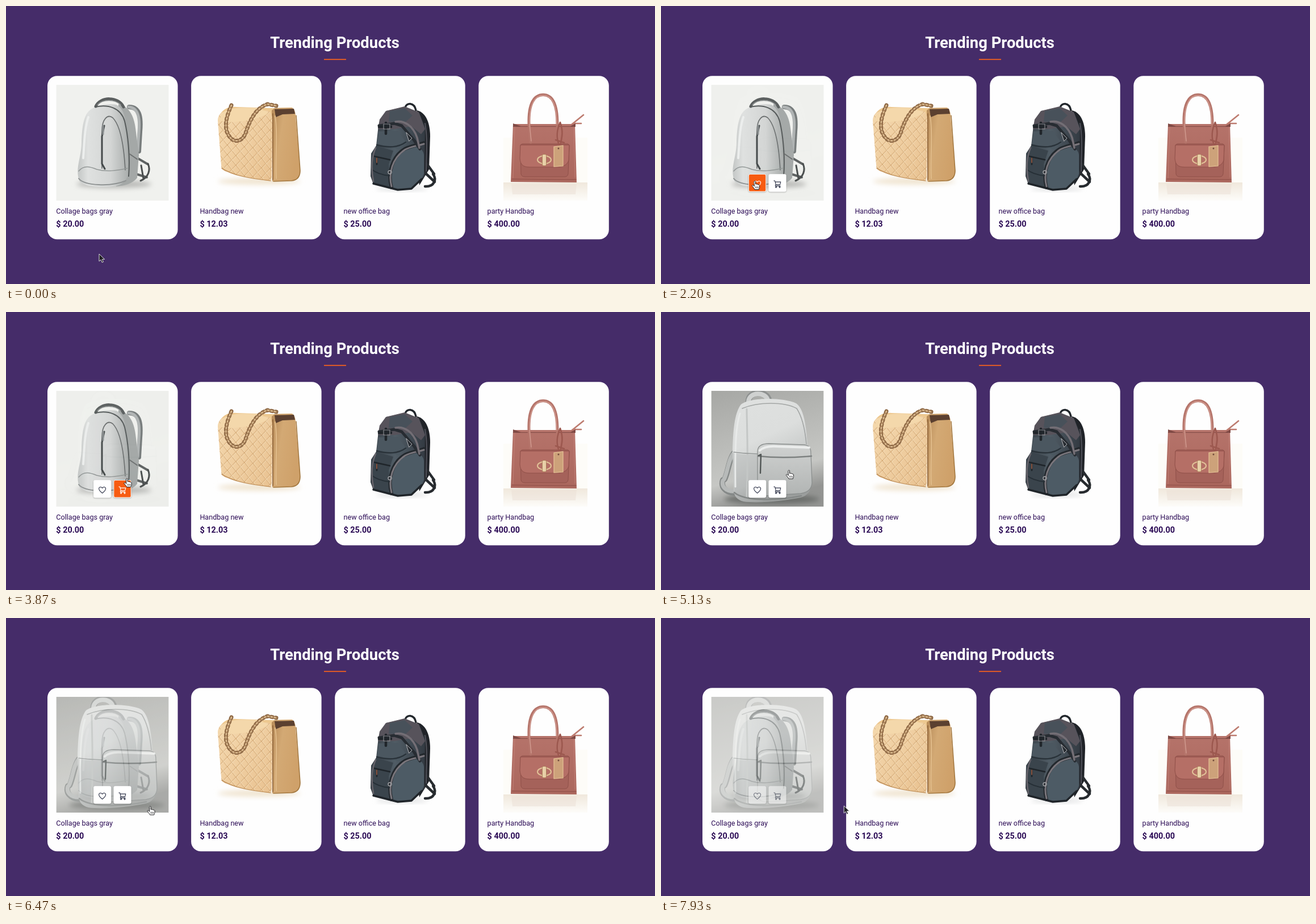
These frames come from a looping animation (1143 by 490 pixels, 8000 ms). An HTML page:

```html
<!DOCTYPE html>
<html lang="en">
<head>
<meta charset="utf-8">
<title>Trending Products</title>
<style>
html, body { margin: 0; width: 100%; height: 100%; overflow: hidden; background: #452c69; }
svg { display: block; width: 100vw; height: 100vh; }
text { font-family: Roboto, "Liberation Sans", sans-serif; fill: #2b0b55; }
.title { font-size: 27.4px; font-weight: 700; fill: #fff; text-anchor: middle; }
.name { font-size: 12.6px; }
.price { font-size: 14.4px; font-weight: 700; }
.line { fill: none; stroke-linecap: round; stroke-linejoin: round; }
</style>
</head>
<body>
<svg id="stage" viewBox="0 0 1143 490" xmlns="http://www.w3.org/2000/svg">
  <defs>
    <linearGradient id="shell"><stop offset="0" stop-color="#c3c6c5"/><stop offset=".2" stop-color="#dfe1e0"/><stop offset=".65" stop-color="#d3d5d4"/><stop offset="1" stop-color="#a9adac"/></linearGradient>
    <linearGradient id="wall" x2=".25" y2="1"><stop offset="0" stop-color="#a6a7a4"/><stop offset=".45" stop-color="#b9bab7"/><stop offset=".78" stop-color="#c6c7c4"/><stop offset="1" stop-color="#939492"/></linearGradient>
    <linearGradient id="pack" x2=".35" y2="1"><stop offset="0" stop-color="#dfe1e0"/><stop offset=".45" stop-color="#dcdedd"/><stop offset=".8" stop-color="#c2c5c4"/><stop offset="1" stop-color="#9b9e9d"/></linearGradient>
    <linearGradient id="pocket" x2="0" y2="1"><stop offset="0" stop-color="#d0d2d1"/><stop offset="1" stop-color="#b1b4b3"/></linearGradient>
    <linearGradient id="cream" x2="1" y2="1"><stop offset="0" stop-color="#f4d8ae"/><stop offset="1" stop-color="#e9c291"/></linearGradient>
    <linearGradient id="side" x2="1" y2=".4"><stop offset="0" stop-color="#b68a58"/><stop offset=".4" stop-color="#d3a974"/><stop offset="1" stop-color="#cfa16a"/></linearGradient>
    <linearGradient id="slate" x2="1" y2="0"><stop offset="0" stop-color="#353d44"/><stop offset=".45" stop-color="#505c65"/><stop offset="1" stop-color="#333a42"/></linearGradient>
    <linearGradient id="rose" x2="0" y2="1"><stop offset="0" stop-color="#b5736a"/><stop offset="1" stop-color="#ab675d"/></linearGradient>
    <linearGradient id="glow" x2="0" y2="1"><stop offset="0" stop-color="#f0e8dc"/><stop offset="1" stop-color="#fdfcf9"/></linearGradient>
    <pattern id="quilt" width="15" height="17" patternUnits="userSpaceOnUse" patternTransform="skewY(6)">
      <path d="M0 0L15 17M15 0L0 17" stroke="#d3a773" stroke-width="1.1"/>
      <path d="M1.3 0L16.3 17M16.3 0L1.3 17" stroke="#fdebcb" stroke-width=".8"/>
    </pattern>
    <clipPath id="photo"><rect x="88.5" y="139" width="198" height="204"/></clipPath>
    <filter id="soft" x="-30%" y="-60%" width="160%" height="220%"><feGaussianBlur stdDeviation="4"/></filter>
    <filter id="drop" x="-30%" y="-30%" width="160%" height="160%"><feDropShadow dx="0" dy="1" stdDeviation="1.3" flood-opacity=".3"/></filter>
  </defs>

  <rect width="1143" height="490" fill="#452c69"/>
  <text class="title" x="579" y="74">Trending Products</text>
  <rect x="560" y="93.3" width="39" height="1.8" fill="#f2601d"/>
  <g id="cards"></g>

  <g id="grayBag">
    <rect x="88.5" y="139" width="198" height="204" fill="#f0f1ee"/>
    <ellipse cx="190" cy="314" rx="66" ry="7" fill="#b9bab7" filter="url(#soft)"/>
    <g class="line">
      <path d="M217 178C237 178 238 200 236 222L234 256" stroke="#777c7c" stroke-width="8"/>
      <path d="M216 178C234 179 236 200 234 222L232 255" stroke="#b0b4b4" stroke-width="5"/>
      <path d="M214 258L250 279M216 292L248 302" stroke="#5e6262" stroke-width="4"/>
      <path d="M250 278C255 289 251 302 237 308M238 281L242 304" stroke="#4a4e4e" stroke-width="3"/>
    </g>
    <path d="M198 173C216 176 225 193 228 215L234 262L231 303C222 314 208 317 194 318Z" fill="#a4a8a7"/>
    <path d="M127 300C124 280 133 264 133 240C134 211 137 195 146 185C157 174 180 171 194 174C207 180 211 197 212 218L216 288C216 305 207 315 190 318C165 321 135 318 129 308Z" fill="url(#shell)"/>
    <g class="line">
      <path d="M158 177C166 159 198 159 207 178" stroke="#5b5f5f" stroke-width="5"/>
      <path d="M161 174C171 164 191 164 202 174" stroke="#8f9393" stroke-width="1.5"/>
      <path d="M157 178C180 173 202 179 209 203C214 224 219 261 216 300" stroke="#555a5a" stroke-width="2"/>
      <path d="M169 286L169 221C169 199 179 190 188 197C203 212 208 252 210 289" stroke="#6c7070" stroke-width="1.7"/>
      <path d="M173 211L169 230V278L174 287" stroke="#44494a" stroke-width="3"/>
      <path d="M171 211V226" stroke="#8b9091" stroke-width="3"/>
      <path d="M128 291C137 280 148 283 160 288C178 293 195 290 214 286" stroke="#929796" stroke-width="1.5"/>
      <path d="M128 304C138 317 185 319 211 308" stroke="#8f9393" stroke-width="2"/>
      <path d="M145 196C138 216 138 244 136 268" stroke="#eceeed" stroke-width="4"/>
      <path d="M218 261L231 270" stroke="#6c7070" stroke-width="2"/>
    </g>
  </g>

  <g id="paleBag" clip-path="url(#photo)">
    <rect x="88.5" y="139" width="198" height="204" fill="url(#wall)"/>
    <ellipse cx="195" cy="330" rx="84" ry="8" fill="#6b6d6b" filter="url(#soft)"/>
    <g class="line">
      <path d="M154 158C154 138 187 138 190 156" stroke="#8e9190" stroke-width="11"/>
      <path d="M154 158C155 140 185 140 188 156" stroke="#cfd1d0" stroke-width="8"/>
      <path d="M128 249C119 261 119 280 112 295M109 296C105 307 112 318 129 319" stroke="#858988" stroke-width="10"/>
      <path d="M128 249C118 261 118 280 111 295M109 297C106 307 113 316 129 316" stroke="#b7bab9" stroke-width="7"/>
    </g>
    <path d="M128 312L126 245C127 210 129 180 140 164C154 150 215 150 238 161C252 170 256 203 258 234L264 302C264 316 259 323 246 327C215 333 171 338 145 334C134 331 128 324 128 312Z" fill="url(#pack)"/>
    <path d="M126 248C139 251 152 252 170 251L170 312C170 321 174 327 180 334C160 336 136 335 130 324Z" fill="#a6a9a8" opacity=".35"/>
    <path d="M170 246C170 236 177 232 190 232L251 234C262 235 264 240 264 250L266 301C265 313 258 318 246 320L184 324C174 324 170 318 170 307Z" fill="url(#pocket)" stroke="#8b8f8e" stroke-width="1.3"/>
    <g class="line">
      <path d="M143 170C171 158 217 158 239 170C250 187 254 210 256 233" stroke="#a3a6a5" stroke-width="1.6"/>
      <path d="M139 179C132 200 130 235 131 308" stroke="#e8eae9" stroke-width="3"/>
      <path d="M151 171C151 200 154 238 151 326" stroke="#c4c7c6" stroke-width="3"/>
      <path d="M128 247C142 249 156 250 170 250" stroke="#979b9a" stroke-width="1.5"/>
      <path d="M171 254C199 257 231 257 265 254" stroke="#7d8180" stroke-width="2.4"/>
      <path d="M174 244C181 237 192 236 205 237L261 239" stroke="#ebedec" stroke-width="4"/>
      <path d="M172 253L176 251L175 284" stroke="#505554" stroke-width="2.4"/>
      <path d="M129 318C147 334 204 333 247 324" stroke="#858988" stroke-width="2.5"/>
    </g>
  </g>

  <g id="quiltedBag">
    <ellipse cx="446" cy="309" rx="73" ry="6" fill="#f0e4d0" filter="url(#soft)"/>
    <path d="M376 192C385 179 394 177 406 178L470 180L506 179L473 194Z" fill="#edc890"/>
    <path d="M468 184L473 180L503 179C508 181 510 187 510 195L518 290C518 302 512 307 503 308L469 309Z" fill="url(#side)"/>
    <path d="M473 182L507 181L509 190L487 191L475 196Z" fill="#5b4030"/>
    <g id="front">
      <path d="M373 202C373 192 379 187 390 185L460 184C467 186 469 192 469 202L468 302C468 307 463 309 455 307C430 304 408 298 389 292C382 290 379 287 379 280Z" fill="url(#cream)"/>
      <path d="M373 202C373 192 379 187 390 185L460 184C467 186 469 192 469 202L468 302C468 307 463 309 455 307C430 304 408 298 389 292C382 290 379 287 379 280Z" fill="url(#quilt)"/>
    </g>
    <path d="M383 187C397 178 420 179 444 180L462 187C456 200 388 210 375 201Z" fill="#f4d8ab"/>
    <g class="line">
      <path d="M470 190V306" stroke="#94683c" stroke-width="1.8"/>
      <path d="M474 194C479 222 474 265 476 304" stroke="#e0bb89" stroke-width="2"/>
      <path d="M380 286C400 299 430 304 466 308" stroke="#c3945e" stroke-width="1.5"/>
      <path d="M511 193L518 290C518 302 512 307 503 308L471 309" stroke="#a4783f" stroke-width="1.6"/>
      <path d="M397 175C390 190 383 211 391 226C401 245 417 238 422 224C428 205 439 179 461 173L476 176" stroke="#8d6845" stroke-width="7" stroke-dasharray="2.5 5.5"/>
      <path d="M397 175C390 190 383 211 391 226C401 245 417 238 422 224C428 205 439 179 461 173L476 176" stroke="#a88159" stroke-width="3.4"/>
      <path d="M397 175C390 190 383 211 391 226C401 245 417 238 422 224C428 205 439 179 461 173L476 176" stroke="#e2c498" stroke-width="2" stroke-dasharray="2 4"/>
    </g>
  </g>

  <g id="darkBag">
    <ellipse cx="697" cy="322" rx="45" ry="3" fill="#d5d7d8" filter="url(#soft)"/>
    <path d="M724 184C741 188 747 209 747 230L745 288L728 316L716 222Z" fill="#202328"/>
    <g class="line">
      <path d="M703 179C705 170 719 169 722 184" stroke="#22272c" stroke-width="3.5"/>
      <path d="M741 278L754 296M738 294L755 310M752 296C759 306 754 319 738 318" stroke="#272b2f" stroke-width="4.5"/>
    </g>
    <path d="M656 210L652 246L643 260L642 300L647 314L690 325L714 323L737 300L738 214L728 189L702 178L670 185Z" fill="url(#slate)"/>
    <path d="M655 217L658 200L669 185L702 177L727 187L738 217L731 226L714 212L684 217Z" fill="#57535b"/>
    <path d="M676 185L702 180L716 193L702 206L674 204Z" fill="#48515a"/>
    <path d="M656 221L690 220L706 242L690 252L653 243Z" fill="#4b5760"/>
    <path d="M643 262L653 247L682 255L674 279L678 321L647 313Z" fill="#3a444c"/>
    <path d="M679 320C672 296 679 266 702 252C717 245 734 248 736 262L736 296C730 311 719 321 706 323Z" fill="#4d5b65"/>
    <g class="line">
      <path d="M679 320C672 296 679 266 702 252C714 246 724 246 736 241" stroke="#23282d" stroke-width="6"/>
      <path d="M679 318C673 296 680 268 703 253C714 247 724 247 736 243" stroke="#7a767c" stroke-width="3"/>
      <path d="M657 211L684 207L697 211L719 237L729 252" stroke="#272c32" stroke-width="5"/>
      <path d="M686 204C701 201 717 211 724 232L728 250" stroke="#736e75" stroke-width="3.5"/>
      <path d="M657 213H678M669 206V225" stroke="#20252a" stroke-width="4.5"/>
      <path d="M665 208H676V217H665Z" stroke="#85888c" stroke-width="1.2"/>
      <path d="M653 245C674 250 690 250 704 240" stroke="#2a333a" stroke-width="2.5"/>
      <path d="M649 265L676 271M653 267V279" stroke="#1f252a" stroke-width="2.8"/>
      <path d="M644 288C654 296 664 298 675 299" stroke="#262f36" stroke-width="2"/>
      <path d="M651 250C644 266 643 287 647 309" stroke="#67646b" stroke-width="2.5"/>
      <path d="M705 223L715 233L710 238Z" fill="#272c32" stroke="#b5b5b8" stroke-width="1"/>
      <circle cx="676" cy="293" r="3" stroke="#a2a4a7" stroke-width="1.4"/>
      <path d="M653 268V276" stroke="#c06b49" stroke-width="1.3"/>
      <path d="M647 313L690 324L714 322L732 305" stroke="#1f2429" stroke-width="3.5"/>
      <path d="M738 207C743 233 740 259 740 291" stroke="#50515a" stroke-width="2"/>
    </g>
  </g>

  <g id="roseBag">
    <rect x="876" y="232" width="148" height="111" fill="#fdfcf8"/>
    <rect x="876" y="311" width="148" height="32" fill="url(#glow)"/>
    <path d="M890 314H1005L1003 332H892Z" fill="#ecdfd5" opacity=".5"/>
    <path class="line" d="M991 213L1017 192M1000 207L1013 207" stroke="#bd7b6f" stroke-width="2.6"/>
    <path d="M893 208H1002L1005 311L889 310Z" fill="url(#rose)"/>
    <path d="M893 207L907 212H994L1003 207V213H893Z" fill="#804a45"/>
    <path d="M906 247Q906 243 911 243H989Q993 244 992 249L990 296Q989 301 984 301H914Q908 301 907 296Z" fill="#a5625a" stroke="#8f5049" stroke-width="1"/>
    <path d="M906 245H992L991 272C988 282 978 284 968 284H922C909 284 906 278 905 269Z" fill="#b56f66" stroke="#8f4f48" stroke-width="1"/>
    <g class="line">
      <path d="M924 240L921 208C920 172 930 156.500 946 156.500C963 156.500 971 174 971 208L973 240" stroke="#b5756b" stroke-width="5"/>
      <path d="M925 238L922 208C921 174 931 157.500 946 157.500C962 157.500 970 174 970 208" stroke="#d29b90" stroke-width="1.4"/>
      <path d="M976 205C970 218 969 232 974 245M976 205C982 222 979 232 976 246M968 236L983 241" stroke="#9c584f" stroke-width="2.6"/>
      <path d="M891 305L1004 306" stroke="#8c4c45" stroke-width="1.2"/>
      <path d="M896 213L893 303M1000 214L1002 302" stroke="#c58278" stroke-width=".8"/>
    </g>
    <path d="M965 248L981 246V282L965 283Z" fill="#cda27a" stroke="#e6c397" stroke-width="1.2"/>
    <circle cx="973" cy="251" r="1.5" fill="#724b3c"/>
    <ellipse cx="948" cy="271" rx="12" ry="7" fill="none" stroke="#e1c297" stroke-width="2"/>
    <rect x="944.5" y="261.5" width="7" height="20" rx="2" fill="#e8d0a8" stroke="#a47952" stroke-width=".8"/>
  </g>

  <g id="buttons"></g>

  <g id="arrow"><path d="M0 0V13L3 10.2L5.2 15L7.5 14L5.4 9.4H9.6Z" fill="#222126" stroke="#eee" stroke-width=".9"/></g>
  <g id="hand" stroke="#1d1d1f" class="line">
    <path d="M-1.5 1C-1.5-.5 1-.5 1 1V5.5C2 4.8 3.2 5 3.4 6C4.3 5.3 5.6 5.7 5.7 6.6C6.8 6.2 8 6.8 8 8V10.5C8 12.5 7 13 6.8 15H-.5C-1 13-4 10.5-5 8.600C-5.5 7.2-3.6 6.6-2.6 8L-1.5 9Z" fill="#fff"/>
    <path d="M1.2 10V12.5M3.4 10V12.5M5.6 10V12.5" stroke-width=".8"/>
  </g>
</svg>
<script>
const LOOP = 8000;
const $ = id => document.getElementById(id);

const products = [
  ["Collage bags gray", "20.00"], ["Handbag new", "12.03"],
  ["new office bag", "25.00"], ["party Handbag", "400.00"]
];
$("cards").innerHTML = products.map(([name, price], i) => {
  const x = 73 + i * 253.1;
  return `<rect x="${x}" y="123.2" width="229.5" height="288" rx="17" fill="#fefefe"/>
    <text class="name" x="${x + 15.3}" y="366">${name}</text>
    <text class="price" x="${x + 15.3}" y="388.6">$ ${price}</text>`;
}).join("");

const heart = '<path d="M0 5.6C-2 3.9-6 .9-6-2.1C-6-5.6-1.7-6.4 0-3.2C1.7-6.4 6-5.6 6-2.1C6 .9 2 3.9 0 5.6Z"/>';
const cart = '<path d="M-6.3-5.7H-4.5L-2.6 1.2H4.6L5.8-3.6H-3.8M-2.6 1.2C-4.2 1.600-4 3.4-2.5 3.4H5"/><circle cx="-2.4" cy="5.4" r="1"/><circle cx="4" cy="5.4" r="1"/>';
const icon = (shape, color) => `<g class="line" stroke="${color}" stroke-width="1.1">${shape}</g>`;
const button = (id, x, shape) => `<g transform="translate(${x} 312)">
  <rect x="-15.5" y="-15.7" width="31" height="31" rx="3" fill="#fff" filter="url(#drop)"/>
  <g transform="translate(0 1.7)">${icon(shape, "#2e3348")}</g>
  <g id="${id}"><rect x="-14.7" y="-15" width="29.4" height="29.6" rx="2" fill="#f75c12"/>
  <g transform="translate(0 1.7)">${icon(shape, "#fff")}</g></g></g>`;
$("buttons").innerHTML = button("heartOn", 169.6, heart) + button("cartOn", 205, cart);

// Pointer stops: time, x, y
const path = [
  [0, 164, 437], [270, 164, 437], [870, 159, 374], [1400, 159, 374],
  [1600, 152.5, 348.5], [1800, 161, 322], [2200, 165.5, 308.5], [2730, 165.5, 308.5],
  [2950, 258, 333], [3200, 205, 312], [3670, 205, 312], [3870, 213, 293.5],
  [4330, 225.5, 279], [5130, 225.5, 279], [5480, 208, 303], [5930, 204, 311],
  [6130, 204, 311], [6470, 254, 332], [7600, 254, 332], [7930, 322, 331], [8000, 323, 331]
];
// Moments at which each hover state flips
const hover = {
  buttons: [370, 7790],
  image: [1670, 1800, 3850, 5420, 6240, 7790],
  heart: [1790, 2780],
  cart: [3000, 3880, 5420, 6200]
};

const mix = (a, b, k) => a + (b - a) * k;
const bezier = (a, b, s) => 3 * a * s * (1 - s) ** 2 + 3 * b * s * s * (1 - s) + s ** 3;

// cubic-bezier(.25, .1, .25, 1)
function ease(x) {
  if (x <= 0 || x >= 1) return x <= 0 ? 0 : 1;
  let lo = 0, hi = 1;
  for (let i = 0; i < 20; i++) {
    const mid = (lo + hi) / 2;
    if (bezier(.25, .25, mid) < x) lo = mid; else hi = mid;
  }
  return bezier(.1, 1, lo);
}

function fade(flips, t, duration) {
  let from = 0, to = 0, start = 0;
  for (const flip of flips) {
    if (flip > t) break;
    from = mix(from, to, ease((flip - start) / duration));
    to = 1 - to;
    start = flip;
  }
  return mix(from, to, ease((t - start) / duration));
}

function slope(i, axis) {
  const a = path[i - 1], p = path[i], b = path[i + 1];
  const turns = !a || !b || (p[axis] - a[axis]) * (b[axis] - p[axis]) <= 0;
  return turns ? 0 : (b[axis] - a[axis]) / (b[0] - a[0]);
}

function along(t, axis) {
  let i = 0;
  while (i < path.length - 2 && path[i + 1][0] <= t) i++;
  const a = path[i], b = path[i + 1], span = b[0] - a[0], k = (t - a[0]) / span;
  const blend = k * k * (3 - 2 * k);
  return mix(a[axis], b[axis], blend)
    + span * k * (1 - k) * ((1 - k) * slope(i, axis) - k * slope(i + 1, axis));
}

function draw(t) {
  $("buttons").setAttribute("opacity", fade(hover.buttons, t, 500));
  $("paleBag").setAttribute("opacity", fade(hover.image, t, 500));
  $("heartOn").setAttribute("opacity", fade(hover.heart, t, 200));
  $("cartOn").setAttribute("opacity", fade(hover.cart, t, 200));
  const pointing = t > 1660 && t < 7740;
  const place = `translate(${along(t, 1)} ${along(t, 2)})`;
  for (const [id, shown] of [["arrow", !pointing], ["hand", pointing]]) {
    $(id).setAttribute("transform", place);
    $(id).setAttribute("visibility", shown ? "visible" : "hidden");
  }
}

const begin = performance.now();
function tick() {
  draw((performance.now() - begin) % LOOP);
  requestAnimationFrame(tick);
}
tick();
</script>
</body>
</html>
```
